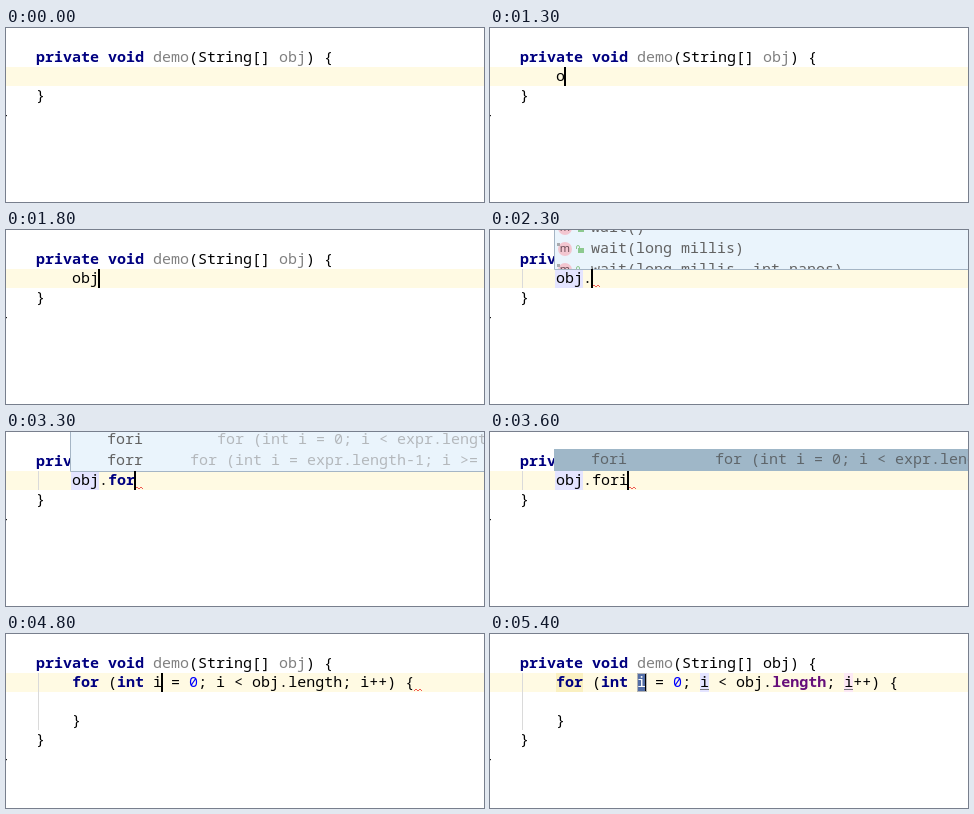
These frames come from a looping animation (478 px wide and 174 px high, 6200 ms). An HTML page:

```html
<!DOCTYPE html>
<html lang="en">
<head>
<meta charset="utf-8">
<title>Postfix completion</title>
<style>
  html, body { margin: 0; width: 100%; height: 100%; overflow: hidden; background: #fff; }
  svg { display: block; width: 478px; height: 174px; }
  text { font: 15px "Noto Sans Mono", "DejaVu Sans Mono", monospace; white-space: pre; fill: #000; }
  .kw { font-weight: 700; fill: #000080; }
  .num { fill: #0000ff; }
  .dim { fill: #808080; }
  .item, .item tspan { fill: #626262; }
  .item .hit { fill: #b01fc4; }
  .tail { fill: #b4b8bc; }
  .chosen text { fill: #5f666b; }
  .field { font-weight: 700; fill: #660e7a; }
  .usage { fill: #e4e4ff; }
  .write { fill: #fce8f4; }
  .panel { fill: #ebf3fe; }
  #waits .panel, #loops .panel { fill: #eaf4fc; }
  .edge { fill: none; stroke: #a5b5c5; }
  .guide { fill: #dadada; }
  .wave { fill: none; stroke: #f05a50; }
  .under { fill: #77777f; }
  .icon text { font: 11px "Noto Sans", sans-serif; fill: #6b4a54; text-anchor: middle; }
</style>
</head>
<body>
<svg viewBox="0 0 478 174">
  <defs>
    <g id="lock">
      <rect x="-2" y="-1" width="6" height="5" fill="#8cc98f"/>
      <path d="M-3.5 0v-2a1.5 1.5 0 0 1 3 0v1" fill="none" stroke="#8cc98f"/>
    </g>
    <path id="wave" class="wave" d="M0 2l2-2 2 2 2-2 2 2"/>
  </defs>

  <rect y="39" width="478" height="19" fill="#fffae3"/>
  <rect class="guide" data-at="2000-4800" x="32" y="39" width="1" height="19"/>
  <rect class="guide" data-at="4800-6200" x="32" y="39" width="1" height="57"/>

  <text x="30" y="34"><tspan class="kw">private void</tspan> <tspan class="dim">demo</tspan>(String[] <tspan class="dim" id="param">obj</tspan>) {</text>

  <g id="tail">
    <text x="30" y="72">}</text>
    <text x="-6" y="91">}</text>
  </g>

  <!-- line being typed -->
  <rect class="usage" data-at="2200-4800" x="65" y="39" width="28" height="19"/>
  <text x="66" y="53" id="typed"></text>
  <use href="#wave" id="error" y="55"/>

  <!-- expanded loop -->
  <g data-at="4800-6200">
    <rect data-at="5200-6200" x="66" y="39" width="27" height="19" fill="#faf0c0"/>
    <g data-at="5400-6200">
      <rect class="usage" x="210" y="39" width="9" height="19"/>
      <rect class="write" x="354" y="39" width="9" height="19"/>
      <rect class="under" x="210" y="55" width="9" height="1"/>
      <rect class="under" x="354" y="55" width="9" height="1"/>
    </g>
    <rect data-at="4900-6200" x="147" y="39" width="9" height="19" fill="#526da5"/>
    <text x="66" y="53"><tspan class="kw">for</tspan> (<tspan class="kw">int</tspan> <tspan id="index">i</tspan> = <tspan class="num">0</tspan>; i &lt; obj.<tspan id="len">length</tspan>; i++) {</text>
    <text x="66" y="91">}</text>
  </g>

  <!-- completion popups -->
  <g data-at="1500-1800" id="methods"></g>
  <g data-at="2200-2600" id="waits"></g>
  <g data-at="2600-3600" id="loops"></g>
  <g data-at="3600-4800" class="chosen">
    <rect x="64" y="17" width="414" height="22" fill="#9fb7c8"/>
    <text x="101" y="32">fori</text>
    <text x="225" y="32">for (int i = 0; i &lt; expr.length; i++)</text>
  </g>

  <rect id="caret" y="39" width="2" height="19"/>
  <rect data-at="4900-6200" x="147.5" y="39.5" width="9" height="18" fill="none" stroke="#b4b4b4"/>
</svg>
<script>
  const LOOP = 6200, LEFT = 66, CHAR = 9;
  const $ = id => document.getElementById(id);

  const panel = x =>
    `<rect class="panel" x="${x}" y="0" width="${478 - x}" height="39"/>
     <path class="edge" d="M${x + .5} 0V39.5H478"/>`;

  const icon = (x, y, pinned) =>
    `<g class="icon"><circle cx="${x}" cy="${y}" r="7" fill="#f3c6d0"/>
     <text x="${x}" y="${y + 3}">m</text>
     ${pinned ? `<path d="M${x - 8} ${y - 6}h3v3h-3z" fill="#a9a9ad"/>` : ''}
     <use href="#lock" x="${x + 15}" y="${y}"/></g>`;

  const label = (x, y, text, kind = 'item') => `<text class="${kind}" x="${x}" y="${y}">${text}</text>`;

  // Rows are 21px apart; whatever passes the lower edge is cut off.
  const list = (id, x, rows, draw) => {
    $(id).innerHTML = `<svg width="478" height="40" viewBox="0 0 478 40">${panel(x)}
      <svg width="478" height="39" viewBox="0 0 478 39">${rows.map(draw).join('')}</svg></svg>`;
  };

  list('methods', 28,
    ['RestartViewModel()', 'RestoreInstanceState(Bundle savedInstance…', 'ResumeViewModel()'],
    (s, i) => icon(38, 21 * i - 2, false) +
      label(65, 2 + 21 * i, `<tspan class="hit">o</tspan>n${s}`) + label(472, 2 + 21 * i, 'void'));

  list('waits', 64, ['wait()', 'wait(long millis)', 'wait(long millis, int nanos)'],
    (s, i) => icon(75, 21 * i - 2, true) + label(101, 2 + 21 * i, s));

  list('loops', 64,
    [['fori', 211, 'for (int i = 0; i &lt; expr.length; i++)'],
     ['forr', 184, 'for (int i = expr.length-1; i &gt;= 0; i--)']],
    ([key, x, hint], i) => label(101, 12 + 21 * i, key) + label(x, 12 + 21 * i, hint, 'tail'));

  const typing = [[0, ''], [1300, 'o'], [1600, 'ob'], [1700, 'obj'], [1900, 'obj.'],
    [2600, 'obj.fo'], [2700, 'obj.for'], [3600, 'obj.fori'], [4800, '']];

  // Column of the error mark, -1 for none.
  const errors = [[0, -1], [2000, 4], [3300, 7], [3600, 8], [4800, 38], [5200, -1]];

  const pick = (steps, t) => steps.filter(s => s[0] <= t).pop()[1];
  const show = (el, on) => { el.style.display = on ? '' : 'none'; };

  const timed = [...document.querySelectorAll('[data-at]')].map(el => {
    const [from, to] = el.dataset.at.split('-').map(Number);
    return { el, from, to };
  });

  function render(t) {
    for (const { el, from, to } of timed) show(el, t >= from && t < to);

    const code = pick(typing, t), expanded = t >= 4800;
    const bold = t >= 3300 && t < 3600;
    $('typed').innerHTML = bold ? 'obj.<tspan class="kw">for</tspan>' : code;

    const mark = pick(errors, t);
    show($('error'), mark >= 0);
    $('error').setAttribute('x', LEFT + mark * CHAR);

    const column = expanded ? 10 : code.length;
    $('caret').setAttribute('x', LEFT + column * CHAR - 1);
    show($('caret'), t >= 700 && !(t >= 4300 && t < 4800));

    $('tail').setAttribute('transform', `translate(0 ${expanded ? 38 : 0})`);
    $('index').style.fill = t >= 4900 ? '#fff' : '';
    $('len').setAttribute('class', t >= 5400 ? 'field' : '');
    $('param').setAttribute('class', t >= 5400 ? '' : 'dim');
  }

  const start = performance.now();
  function frame() {
    render((performance.now() - start) % LOOP);
    requestAnimationFrame(frame);
  }
  frame();
</script>
</body>
</html>
```
